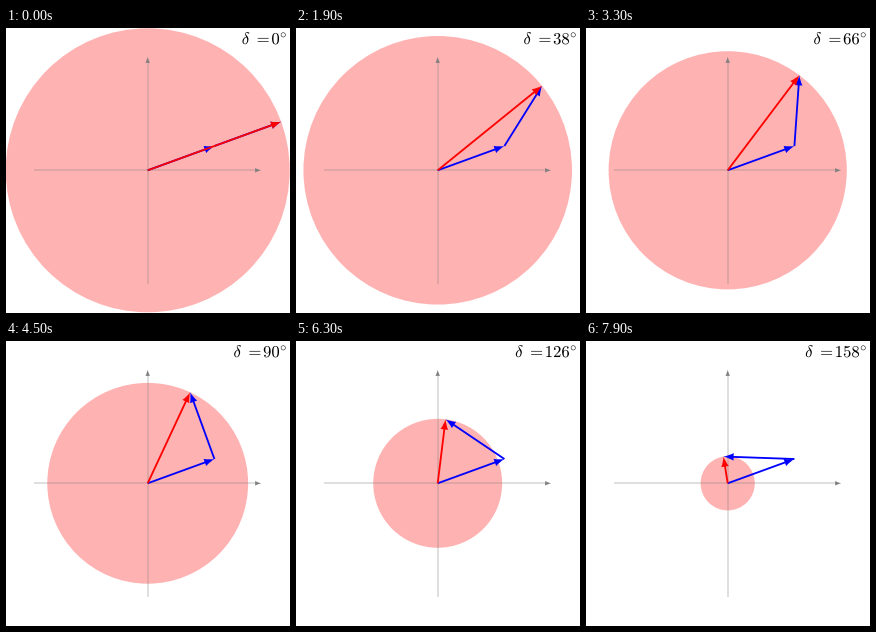
Write a matplotlib script that moves like this. It is 284 px wide and 285 px high and loops after 8000 ms.

```python
import numpy as np
import matplotlib.pyplot as plt
from matplotlib.animation import FuncAnimation
from matplotlib.patches import Circle, PathPatch
from matplotlib.path import Path
from matplotlib.textpath import TextPath

plt.rcParams["mathtext.fontset"] = "cm"

W, H = 284, 285
PT = W / 170.7            # pixels per typographic point
EM = 10 * PT
CENTER = np.array([141.7, H - 142.3])
ARM = 71                  # length of each blue vector
BASE_ANGLE = 20           # degrees
AXIS = 113.6
STEP, FRAMES, INTERVAL = 2, 80, 100
BASELINE, DEGREE_X = H - 16.1, 273.7

fig = plt.figure(figsize=(W / 72, H / 72), dpi=72, facecolor="white")
ax = fig.add_axes([0, 0, 1, 1])
ax.set(xlim=(0, W), ylim=(0, H))
ax.axis("off")


def polar(length, degrees):
    a = np.radians(degrees)
    return length * np.array([np.cos(a), np.sin(a)])


class Arrow:
    """Straight line with a curved, filled head."""

    CODES = [Path.MOVETO] + [Path.CURVE4] * 3 + [Path.LINETO] + [Path.CURVE4] * 3

    def __init__(self, color, width, zorder):
        t = (0.28 + 0.3 * width) * PT
        self.t = t
        self.shape = t * np.array([
            (0, 0), (-2.667, 0.5), (-7, 2), (-10, 3.75),
            (-10, -3.75), (-7, -2), (-2.667, -0.5), (0, 0)])
        self.line, = ax.plot([], [], color=color, lw=width * PT,
                             solid_capstyle="butt", zorder=zorder)
        self.head = PathPatch(Path([(0, 0)]), fc=color, lw=0, zorder=zorder)
        ax.add_patch(self.head)

    def place(self, start, end):
        d = (end - start) / np.hypot(*(end - start))
        self.line.set_data(*np.transpose([start, end - 9 * self.t * d]))
        turn = np.array([d, (-d[1], d[0])])
        self.head.set_path(Path(self.shape @ turn + end, self.CODES))


def glyphs(x, y, tex, size=EM):
    return TextPath((x, y), f"${tex}$", size=size)


def label_path(delta):
    digits = DEGREE_X - 0.5 * EM * len(str(delta))
    return Path.make_compound_path(
        glyphs(digits - 1.778 * EM, BASELINE, r"\delta"),
        glyphs(digits - 1.056 * EM, BASELINE, "="),
        glyphs(digits, BASELINE, str(delta)),
        glyphs(DEGREE_X + 0.4, BASELINE + 0.363 * EM, r"\circ", 0.75 * EM))


disc = ax.add_patch(Circle(CENTER, 2 * ARM, fc="#ffb2b2", lw=0, zorder=1))
for direction in np.eye(2):
    Arrow("#808080", 0.3, 2).place(CENTER - AXIS * direction,
                                   CENTER + AXIS * direction)
first = Arrow("#0000ff", 1.1, 3)
second = Arrow("#0000ff", 1.1, 4)
total = Arrow("#ff0000", 1.1, 5)
label = ax.add_patch(PathPatch(Path([(0, 0)]), fc="black", lw=0, zorder=6))

elbow = CENTER + polar(ARM, BASE_ANGLE)
first.place(CENTER, elbow)


def update(i):
    delta = STEP * i
    tip = elbow + polar(ARM, BASE_ANGLE + delta)
    second.place(elbow, tip)
    total.place(CENTER, tip)
    disc.set_radius(np.hypot(*(tip - CENTER)))
    label.set_path(label_path(delta))
    return disc, label


anim = FuncAnimation(fig, update, frames=FRAMES, interval=INTERVAL,
                     repeat=True, repeat_delay=0)
plt.show()
```
